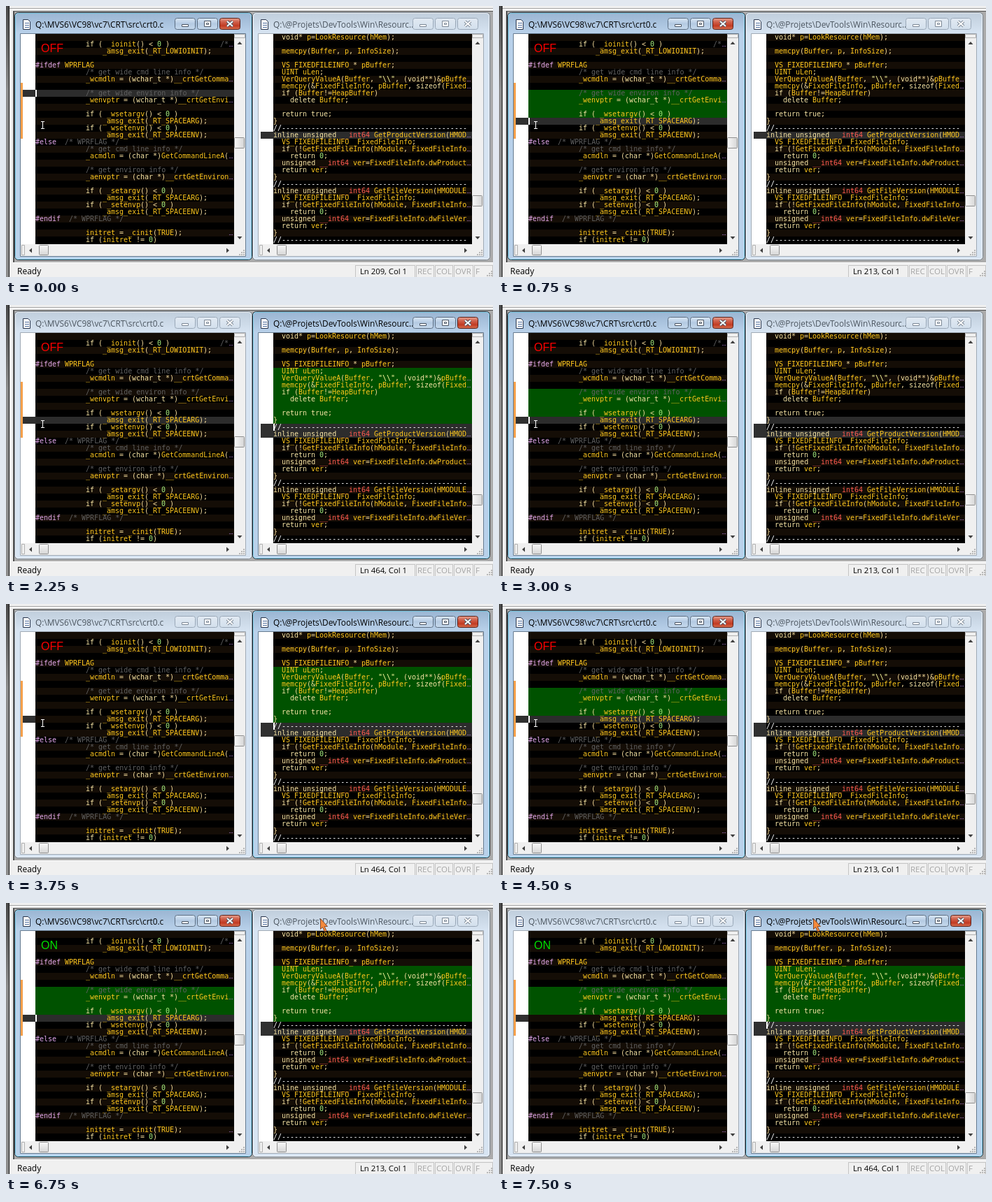
These frames come from a looping animation (696x388 px, 8000 ms). An HTML page with a canvas:

```html
<!DOCTYPE html>
<html lang="en">
<head>
<meta charset="utf-8">
<style>
  html, body { margin: 0; width: 100%; height: 100%; overflow: hidden; background: #f0f0f0; }
  canvas { display: block; }
</style>
</head>
<body>
<canvas id="stage" width="696" height="388"></canvas>
<script>
const ctx = document.getElementById('stage').getContext('2d');
const LOOP = 8000, STEP = 750, ROW = 10, TOP = 40, BOTTOM = 341;
const UI = '"Open Sans", "Noto Sans", sans-serif';
const MONO = '10px "DejaVu Sans Mono", monospace';
const DASHES = '//' + '-'.repeat(44);
const I12 = ' '.repeat(12), I16 = ' '.repeat(16);

// One entry per 10 px row; a trailing ~ marks a line cut off at the right edge.
const leftCode = [
  '',
  I12 + 'if ( _ioinit() < 0 )            /*~',
  I16 + '_amsg_exit(_RT_LOWIOINIT);',
  '',
  '#ifdef WPRFLAG',
  I12 + '/* get wide cmd line info */',
  I12 + '_wcmdln = (wchar_t *)__crtGetComma~',
  '',
  I12 + '/* get wide environ info */',
  I12 + '_wenvptr = (wchar_t *)__crtGetEnvi~',
  '',
  I12 + 'if ( _wsetargv() < 0 )',
  I16 + '_amsg_exit(_RT_SPACEARG);',
  I12 + 'if ( _wsetenvp() < 0 )',
  I16 + '_amsg_exit(_RT_SPACEENV);',
  '#else  /* WPRFLAG */',
  I12 + '/* get cmd line info */',
  I12 + '_acmdln = (char *)GetCommandLineA(~',
  '',
  I12 + '/* get environ info */',
  I12 + '_aenvptr = (char *)__crtGetEnviron~',
  '',
  I12 + 'if ( _setargv() < 0 )',
  I16 + '_amsg_exit(_RT_SPACEARG);',
  I12 + 'if ( _setenvp() < 0 )',
  I16 + '_amsg_exit(_RT_SPACEENV);',
  '#endif  /* WPRFLAG */',
  '',
  I12 + 'initret = _cinit(TRUE);           ~',
  I12 + 'if (initret != 0)'
];

const versionGetter = (signature, field) => [
  DASHES,
  'inline unsigned __int64 ' + signature + '~',
  '  VS_FIXEDFILEINFO_ FixedFileInfo;',
  '  if (!GetFixedFileInfo(hModule, FixedFileInfo~',
  '    return 0;',
  '  unsigned __int64 ver=FixedFileInfo.' + field + '~',
  '  return ver;',
  '}'
];
const rightCode = [
  '  void* p=LookResource(hMem);',
  '',
  '  memcpy(Buffer, p, InfoSize);',
  '',
  '  VS_FIXEDFILEINFO_* pBuffer;',
  '  UINT uLen;',
  '  VerQueryValueA(Buffer, "\\\\", (void**)&pBuffe~',
  '  memcpy(&FixedFileInfo, pBuffer, sizeof(Fixed~',
  '  if (Buffer!=HeapBuffer)',
  '    delete Buffer;',
  '',
  '  return true;',
  '}',
  ...versionGetter('GetProductVersion(HMOD', 'dwProduct'),
  ...versionGetter('GetFileVersion(HMODULE', 'dwFileVer'),
  DASHES
];

const TOKEN = /\/\*.*|\/\/.*|#\w+|"[^"]*"|[A-Za-z_]\w*|\d+|[^\sA-Za-z_\d"#]/g;
const KEYWORD = /^(if|return|delete|true|sizeof|inline|unsigned|void|char|wchar_t)$/;

function tokenColor(token) {
  if (token.startsWith('/*')) return '#606060';
  if (token.startsWith('//')) return '#fff';
  if (token[0] === '#') return '#e4a8ec';
  if (token === '__int64') return '#ff5a50';
  if (KEYWORD.test(token)) return '#f6e4a4';
  if (/^\d/.test(token)) return '#a8f080';
  if (token[0] === '"') return '#ffffa0';
  return /^\w/.test(token) ? '#ffc81e' : '#f6dc9c';
}

function rect(x, y, w, h, color) {
  ctx.fillStyle = color;
  ctx.fillRect(x, y, w, h);
}

function text(str, x, y, color, font) {
  ctx.font = font;
  ctx.fillStyle = color;
  ctx.fillText(str, x, y);
}

function box(x, y, w, h, fill, stroke, radius = 0) {
  ctx.beginPath();
  ctx.roundRect(x + .5, y + .5, w - 1, h - 1, radius);
  ctx.fillStyle = fill;
  ctx.fill();
  ctx.strokeStyle = stroke;
  ctx.lineWidth = 1;
  ctx.stroke();
}

function polygon(points, fill, stroke) {
  ctx.beginPath();
  points.forEach(([x, y]) => ctx.lineTo(x, y));
  ctx.closePath();
  ctx.fillStyle = fill;
  ctx.fill();
  if (stroke) {
    ctx.strokeStyle = stroke;
    ctx.lineWidth = 1;
    ctx.stroke();
  }
}

function gradient(x0, y0, x1, y1, ...colors) {
  const g = ctx.createLinearGradient(x0, y0, x1, y1);
  colors.forEach((c, i) => g.addColorStop(i / (colors.length - 1), c));
  return g;
}
const vertical = (y0, y1, ...colors) => gradient(0, y0, 0, y1, ...colors);

function arrow(x, y, angle) {
  ctx.save();
  ctx.translate(x, y);
  ctx.rotate(angle);
  polygon([[-3.5, 2], [0, -2], [3.5, 2]], '#404040');
  ctx.restore();
}

// Triangle of dots whose corner sits at (x, y).
function sizeGrip(x, y) {
  for (let i = 0; i < 3; i++)
    for (let j = 0; j < 3 - i; j++) rect(x - 2 - i * 3, y - 2 - j * 3, 2, 2, '#b8b8b8');
}

function drawCode(x, lines) {
  lines.forEach((line, i) => {
    const baseline = TOP + i * ROW + 8;
    for (const m of line.replace('~', '').matchAll(TOKEN))
      text(m[0], x + 21 + m.index * 6, baseline, tokenColor(m[0]), MONO);
    if (line.endsWith('~'))
      for (let d = 0; d < 3; d++) rect(x + 298 + d * 2, baseline - 1, 1, 1, '#a070c0');
  });
}

function drawEditor(x, pane) {
  rect(x, TOP, 21, BOTTOM - TOP, '#fff');
  for (let i = 0; i < 30; i++)
    rect(x + 21, TOP + i * ROW, 284, ROW, i % 2 ? '#000' : '#140d06');
  rect(x + 21, 340, 284, 1, '#000');
  for (const row of pane.marks) rect(x + 3, TOP + row * ROW, 18, ROW, '#303030');
  for (const row of pane.lit) rect(x + 21, TOP + row * ROW, 284, ROW, '#2c2c2c');
  if (pane.selected) {
    const [from, to] = pane.selection;
    rect(x + 21, TOP + from * ROW, 284, (to - from) * ROW, '#005200');
  }
  drawCode(x, pane.code);
  if (pane.active) rect(x + 21, TOP + pane.caret * ROW, 2, ROW, '#fff');
}

function drawScrollbars(x, thumbY) {
  rect(x + 305, TOP, 16, 318, '#f0f0f0');
  rect(x, BOTTOM, 321, 17, '#f0f0f0');
  box(x + 305, TOP, 16, 6, '#f0f0f0', '#b0b0b0');
  box(x + 1, 342, 5, 15, '#f0f0f0', '#b0b0b0');
  arrow(x + 313, 53, 0);
  arrow(x + 313, 332, Math.PI);
  arrow(x + 14, 350, -Math.PI / 2);
  arrow(x + 296, 350, Math.PI / 2);
  box(x + 305, thumbY, 15, 16, gradient(x + 305, 0, x + 320, 0, '#fafafa', '#d4d4d4'), '#909090', 1);
  box(x + 26, 342, 14, 15, vertical(342, 357, '#fafafa', '#d4d4d4'), '#909090', 1);
  sizeGrip(x + 320, 357);
}

function drawButtons(x, active) {
  const edge = active ? '#5c6e82' : '#9aa8b8';
  for (let i = 0; i < 3; i++) {
    const left = x + 220 + i * 32, close = i === 2 && active;
    const fill = close ? vertical(17, 34, '#e9a898', '#d0614c', '#c23a22', '#d87858')
      : active ? vertical(17, 34, '#dce9f6', '#b4cae2', '#c8dbee')
      : vertical(17, 34, '#e2eaf3', '#d2dfec');
    box(left, 17, 30, 17, fill, close ? '#5a2018' : edge, 3);
  }
  const outline = active ? '#4a5564' : '#7c8896';
  box(x + 230, 26, 10, 4, '#fff', outline);
  box(x + 262, 21, 10, 9, '#fff', outline);
  box(x + 265, 24, 4, 3, '#fff', outline);
  for (const [color, width] of [[outline, 4], ['#fff', 2]]) {
    ctx.strokeStyle = color;
    ctx.lineWidth = width;
    ctx.beginPath();
    ctx.moveTo(x + 295, 22); ctx.lineTo(x + 303, 29);
    ctx.moveTo(x + 303, 22); ctx.lineTo(x + 295, 29);
    ctx.stroke();
  }
}

function drawPageIcon(x) {
  polygon([[x + 3.5, 19.5], [x + 10.5, 19.5], [x + 13.5, 22.5], [x + 13.5, 33.5], [x + 3.5, 33.5]], '#fff', '#28344c');
  for (let y = 24; y < 32; y += 3) rect(x + 6, y, 6, 1, '#4a6a9c');
}

function drawWindow(x, pane) {
  const { active } = pane;
  const frame = active ? vertical(9, 39, '#99b4d1', '#b9d1ea') : vertical(9, 39, '#bfcddb', '#d7e4f2');
  box(x - 9, 9, 340, 355, frame, active ? '#1c2732' : '#76828e', 5);
  ctx.beginPath();
  ctx.roundRect(x - 7.5, 10.5, 337, 352, 4);
  ctx.strokeStyle = active ? '#8fdcf6' : '#f0f5fa';
  ctx.stroke();
  box(x - 1, 39, 323, 320, '#fff', active ? '#667b90' : '#a0aab5');
  drawPageIcon(x);
  text(pane.title, x + 21, 31, active ? '#000' : '#4c5660', '11.85px ' + UI);
  drawButtons(x, active);
  drawEditor(x, pane);
  drawScrollbars(x, pane.thumbY);
}

function drawShell(lineNumber) {
  rect(0, 0, 696, 388, '#f0f0f0');
  rect(0, 0, 4, 388, vertical(0, 120, '#484848', '#8c8c8c'));
  rect(4, 0, 1, 388, '#181818');
  rect(5, 3, 691, 1, '#a0a0a0');
  rect(5, 4, 691, 1, '#fff');
  rect(10, 7, 686, 1, '#505050');
  rect(10, 7, 2, 361, '#505050');
  rect(12, 8, 684, 359, '#ababab');
  rect(10, 367, 686, 1, '#fff');

  text('Ready', 16, 384, '#000', '12px ' + UI);
  for (const [x, w] of [[499, 86], [586, 26], [613, 26], [640, 28], [669, 27]]) {
    ctx.strokeStyle = '#c4c4c4';
    ctx.lineWidth = 1;
    ctx.strokeRect(x + .5, 371.5, w - 1, 18);
  }
  text(`Ln ${lineNumber}, Col 1`, 506, 384, '#000', '11.3px ' + UI);
  [['REC', 588], ['COL', 615], ['OVR', 642], ['F', 671]]
    .forEach(([label, x]) => text(label, x, 384, '#a5a5a5', '11.5px ' + UI));
  sizeGrip(695, 387);
}

function drawBeam() {
  rect(50, 165, 5, 1, '#fff');
  rect(52, 165, 1, 11, '#fff');
  rect(50, 175, 5, 1, '#fff');
}

function drawPointer() {
  polygon([[449.5, 22.5], [449.5, 37.5], [452.5, 34.5], [455.5, 41], [458, 39.8], [455.2, 33.5], [459.5, 33.5]],
    '#f58a3c', '#8a4a28');
}

function render(time) {
  const step = Math.floor((time % LOOP) / STEP);
  const leftActive = [0, 1, 4, 6, 9].includes(step);
  const on = step >= 9;
  const leftCaret = step < 1 ? 8 : 12;
  const rightCaret = step < 3 ? 5 : 13;
  const functionRow = 14;

  const left = {
    title: 'Q:\\MVS6\\VC98\\vc7\\CRT\\src\\crt0.c',
    code: leftCode, active: leftActive, caret: leftCaret, thumbY: 188,
    marks: [leftCaret],
    lit: leftActive || step < 4 ? [leftCaret] : [],
    selection: [8, 12], selected: step >= 1 && (leftActive || on)
  };
  const right = {
    title: 'Q:\\@Projets\\DevTools\\Win\\Resourc...',
    code: rightCode, active: !leftActive, caret: rightCaret, thumbY: 271,
    marks: step < 2 ? [functionRow] : [rightCaret, functionRow],
    lit: step < 2 ? [functionRow] : [leftActive ? rightCaret - 1 : rightCaret, functionRow],
    selection: [5, 13], selected: step >= 3 && (!leftActive || on)
  };

  drawShell(leftActive ? 201 + leftCaret : 451 + rightCaret);
  drawWindow(21, left);
  drawWindow(361, right);
  rect(21, 110, 3, 80, '#f5a04a');
  text(on ? 'ON' : 'OFF', 50, 66, on ? '#00e000' : '#f00', '16px "Liberation Sans", sans-serif');
  if (step < 8) drawBeam();
  if (on) drawPointer();
}

const start = performance.now();
function tick() {
  render(performance.now() - start);
  requestAnimationFrame(tick);
}
tick();
</script>
</body>
</html>
```
